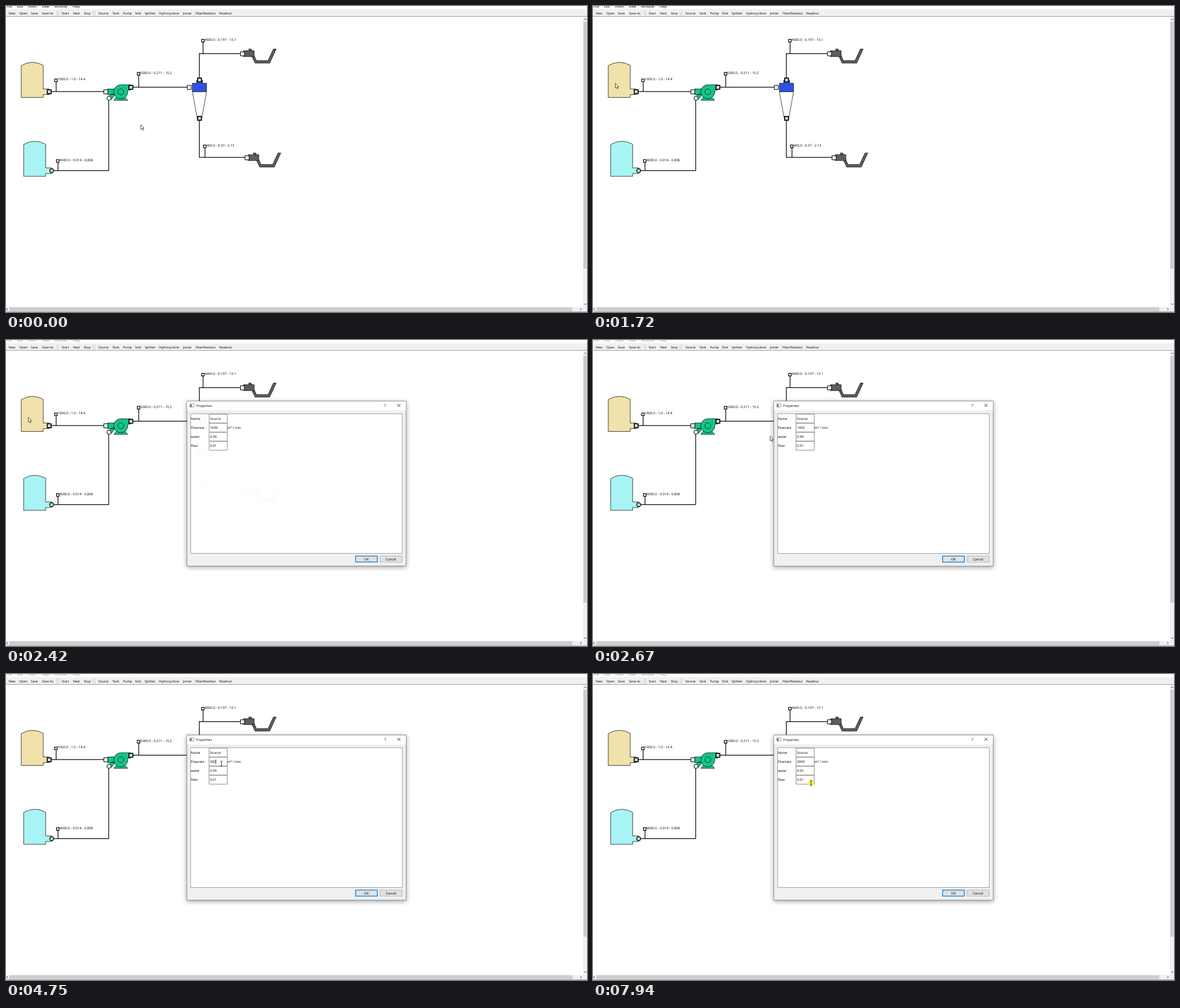
Animation of 1030x544 px, one loop 7990 ms. Source, as an HTML page:

```html
<!DOCTYPE html>
<html lang="en">
<head>
<meta charset="utf-8">
<title>Flow diagram</title>
<style>
  html, body { margin: 0; width: 100%; height: 100%; overflow: hidden; background: #fff; }
  svg { display: block; width: 1030px; height: 544px; }
  text { font: 6px "Open Sans", "Noto Sans", sans-serif; text-rendering: geometricPrecision; white-space: pre; }
  #tools text { font-size: 5.68px; }
  .part { stroke: #111; stroke-width: .8; }
  .pipe { fill: none; stroke: #000; stroke-width: 1.25; }
  .out { fill: #bfe3bf; stroke: #000; stroke-width: 1.7; }
  .in { fill: #dcf3dc; stroke: #000; stroke-width: 1; }
  .chevron { fill: none; stroke: #444; stroke-width: 1; }
  .field { fill: #fff; stroke: #666; stroke-width: .8; }
  #frame { filter: drop-shadow(0 2px 4px rgba(0, 0, 0, .38)); }
</style>
</head>
<body>
<svg viewBox="0 0 1030 544">
  <defs>
    <path id="tank" class="part" d="M27 162.5V106Q46.5 94.5 66 105.5V147.5H76.5V157.5H66V162.5Z"/>
    <g id="sink" fill="#605c59">
      <path class="part" d="M430 76.5H434.5L444 97H464.5L474 76.5H479L467.5 101.5H441.5Z"/>
      <path class="part" d="M421 79.5H440V90H421Z"/>
      <path class="in" d="M415.5 81.3h7.4v7.4h-7.4z"/>
    </g>
  </defs>

  <!-- Window chrome -->
  <path fill="#f0f0f0" d="M0 5.5H1030V18H0ZM1023 19H1030V544H0V535H1023Z"/>
  <path fill="#a0a0a0" d="M0 18H1030V19H0ZM0 543H1030V544H0Z"/>
  <path fill="#cdcdcd" d="M1023.5 28H1029.5V467H1023.5ZM6 535.5H1004V542.5H6Z"/>
  <path class="chevron" d="M1025 24.7l2-2 2 2M1025 529l2 2 2-2M3 537l-2 2 2 2M1018 537l2 2-2 2"/>
  <path stroke="#c4c4c4" stroke-width=".8" d="M90.5 8V17M93.5 8V17M154.5 8V17M157.5 8V17"/>
  <g id="menu"></g>
  <g id="tools"></g>

  <!-- Process diagram -->
  <path class="pipe" d="M80 152H174M182 168V292.5H84M225 144.3H321M342.7 128V84.5H415M342.7 203V269H424"/>
  <g id="readouts"></g>
  <use href="#tank" fill="#f0e2aa"/>
  <use href="#tank" x="4.3" y="140.3" fill="#a8f3f3"/>
  <g fill="#14c489">
    <path class="part" d="M188 156L193 158L187 166L181 162ZM180 147.5H192V157.5H180ZM196 162L191 167.7H216L210.5 162Z"/>
    <path class="part" d="M221 140H203.5A12.5 12.5 0 1 0 216 152.5V149.5H221Z"/>
    <circle class="part" cx="203.5" cy="152.5" r="5.2"/>
  </g>
  <path class="part" fill="#2d53e3" d="M338 132H348.5V137.3H355.5V152.5H330.5V137.3H338Z"/>
  <path class="part" fill="#fff" d="M330.5 152.5H355.5L347 200H339Z"/>
  <path class="in" d="M173.3 148.8h7.4v7.4h-7.4zM321.3 141h7.4v7.4h-7.4z"/>
  <path class="out" d="M73.2 149h6.8v6.8h-6.8zM218 141.2h6.8v6.8h-6.8zM339.7 128.2h6.8v6.8h-6.8zM339.7 196.4h6.8v6.8h-6.8z"/>
  <circle class="in" cx="182.7" cy="164" r="3.8"/>
  <circle class="out" cx="81" cy="292.8" r="3.5" style="stroke-width:1.4"/>
  <use href="#sink"/>
  <use href="#sink" x="8.2" y="184.8"/>

  <!-- Properties dialog -->
  <g id="dialog">
    <path id="frame" fill="#f0f0f0" stroke="#777" stroke-width=".8" d="M320.7 108.5H709.4V402H320.7Z"/>
    <path fill="#fff" d="M321 109H709V125H321Z"/>
    <path fill="#fff" stroke="#828790" stroke-width=".8" d="M327.3 131H702.6V379.5H327.3Z"/>
    <path fill="#fff" stroke="#777" stroke-width=".7" d="M325.7 113H333V119.3H325.7Z"/>
    <path fill="#3c5a78" d="M326.5 114.5H329V118.5H326.5Z"/>
    <text x="337" y="118.8" style="font-size:5.85px">Properties</text>
    <text x="670.7" y="119" style="font-size:7px">?</text>
    <path stroke="#222" stroke-width=".9" d="M694 113.7l5.2 5.2M699.2 113.7l-5.2 5.2"/>
    <g id="rows"></g>
    <text x="392.5" y="158.2">m<tspan dy="-2" style="font-size:4px">3</tspan><tspan dy="2"> / min</tspan></text>
    <path fill="#e1e1e1" stroke="#0078d7" stroke-width="1.3" d="M619.8 384.2H658.4V394.8H619.8Z"/>
    <path fill="#e1e1e1" stroke="#adadad" stroke-width=".8" d="M663.2 384H702.4V395H663.2Z"/>
    <text x="639" y="391.7" text-anchor="middle">OK</text>
    <text x="682.5" y="391.7" text-anchor="middle">Cancel</text>
    <path id="caret" stroke="#000" stroke-width=".8" d="M0 -6.2V2"/>
  </g>

  <circle id="halo" r="5.4" fill="#fff02a" opacity=".88"/>
  <path id="arrow" fill="#fff" stroke="#222" stroke-width=".8" stroke-linejoin="round"
    d="M0 0V8.4L2 6.7L3.4 9.8L4.7 9.2L3.4 6.2H6Z"/>
  <path id="ibeam" fill="none" stroke="#222" stroke-width=".9" d="M-1.8 -4.3H1.8M0 -4.3V4.3M-1.8 4.3H1.8"/>
</svg>
<script>
const LOOP = 7990;
const $ = id => document.getElementById(id);
const show = (el, on) => el.setAttribute('visibility', on ? 'visible' : 'hidden');
const move = (el, x, y) => el.setAttribute('transform', `translate(${x} ${y})`);
const clamp = v => Math.min(1, Math.max(0, v));
const within = (t, spans) => spans.some(([a, b]) => t >= a && t < b);
const labels = (items, y) => items.map(([x, s]) => `<text x="${x}" y="${y}">${s}</text>`).join('');

$('menu').innerHTML = labels([[1, 'File'], [19.5, 'Edit'], [39, 'Insert'], [63.5, 'View'],
  [85.5, 'Window'], [118, 'Help']], 3);
$('tools').innerHTML = labels([[4.8, 'New'], [23.6, 'Open'], [44.2, 'Save'], [64, 'Save As'],
  [98.8, 'Start'], [118.7, 'Next'], [138, 'Stop'], [163.7, 'Source'], [188.4, 'Tank'],
  [207.5, 'Pump'], [228.8, 'Sink'], [246, 'Splitter'], [271, 'Hydrocyclone'], [313.8, 'Joiner'],
  [336, 'FiberReadout'], [378, 'Readout']], 14.8);

// Each readout: x, y, pipe level, text
$('readouts').innerHTML = [
  [88.5, 132, 152, '1000.0 - 1.0 - 14.4'],
  [91.8, 275.4, 292.5, '4000.0 - 0.014 - 0.806'],
  [235, 120.4, 144, '5000.0 - 0.211 - 15.2'],
  [349, 61.5, 84.5, '4600.0 - 0.197 - 13.1'],
  [352.4, 249.4, 269, '400.0 - 0.37 - 2.13'],
].map(([x, y, base, s]) => `<path class="pipe" d="M${x + .4} ${y}V${base}"/>
  <path class="pipe" style="fill:#fff" d="M${x - 2.3} ${y - 2.2}h4.6v4.6h-4.6z"/>
  <text x="${x + 3}" y="${y + .4}">${s}</text>`).join('');

$('rows').innerHTML = ['Name', 'Flowrate', 'water', 'fiber'].map((name, i) => {
  const y = 131.8 + 16.1 * i;
  return `<text x="327.6" y="${y + 10.3}">${name}</text>
    <path class="field" d="M360 ${y}h32.2v15.8h-32.2z"/>
    <rect class="mark" x="361.3" y="${y + 4.2}" width="14" height="8.2" fill="#0078d7" visibility="hidden"/>
    <text class="value" x="361.5" y="${y + 10.3}"></text>`;
}).join('');
const values = [...document.querySelectorAll('.value')];
const marks = [...document.querySelectorAll('.mark')];

// Pointer moves: start, end, target x, y
const moves = [
  [0, 1, 239, 211], [880, 1400, 40, 139.3], [1660, 1720, 39.5, 137.5],
  [2430, 2760, 374, 178], [2760, 2880, 374, 164.5], [2910, 3100, 381.5, 167.3],
  [3250, 3400, 382, 159.5], [5750, 5810, 387.7, 174.6], [7550, 7740, 386.5, 193.6],
];
const clicks = [[2100, 2170], [2230, 2290], [3440, 3550], [3600, 3700], [5960, 6060], [7940, LOOP]];
const caretOn = [[3440, 4010], [4370, 5500], [5960, 6480], [6820, 7550]];
const flowSteps = [[0, '1000'], [4370, '3'], [4650, '30'], [4750, '300'], [4980, '3000']];
const waterSteps = [[0, '0.99'], [6820, '0.9'], [6940, '0.95']];
const typed = (steps, t) => steps.filter(s => s[0] <= t).pop()[1];

function pointer(t) {
  let [, , x, y] = moves[0];
  for (const [start, end, toX, toY] of moves) {
    const p = clamp((t - start) / (end - start)), k = p * p * (3 - 2 * p);
    x += (toX - x) * k;
    y += (toY - y) * k;
  }
  return [x, y];
}

function draw(t) {
  const opened = clamp((t - 2270) / 200), rest = (1 - opened) ** 3;
  $('dialog').setAttribute('opacity', 1 - rest);
  $('dialog').setAttribute('transform', `translate(515 255) scale(${1 - .06 * rest}) translate(-515 -255)`);
  $('menu').setAttribute('fill', opened ? '#999' : '#000');

  ['Source', typed(flowSteps, t), typed(waterSteps, t), '0.01']
    .forEach((s, i) => { values[i].textContent = s; });
  const selected = within(t, [[3600, 4370]]);
  show(marks[1], selected);
  values[1].setAttribute('fill', selected ? '#fff' : '#000');

  const active = values[t < 5960 ? 1 : 2];
  show($('caret'), within(t, caretOn));
  move($('caret'), 361.7 + active.getComputedTextLength(), +active.getAttribute('y'));

  const [x, y] = pointer(t), editing = opened > 0 && x > 360;
  show($('arrow'), !editing);
  show($('ibeam'), editing);
  show($('halo'), within(t, clicks));
  for (const id of ['arrow', 'ibeam', 'halo']) move($(id), x, y);
}

const begin = performance.now();
(function tick() {
  draw((performance.now() - begin) % LOOP);
  requestAnimationFrame(tick);
})();
</script>
</body>
</html>
```
